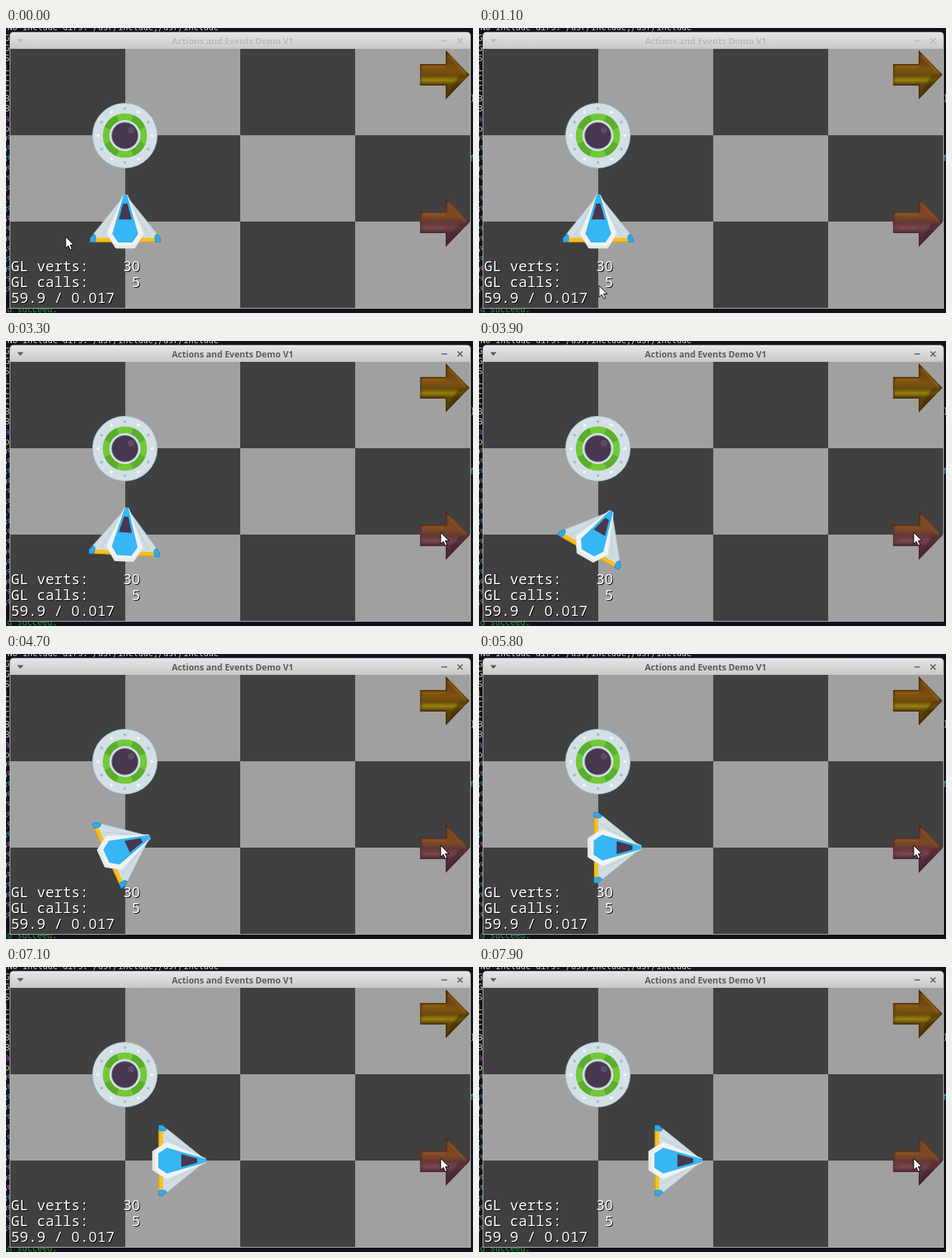
An HTML page that plays this animation: 650x396 px, repeating every 8 s.

```html
<!DOCTYPE html>
<html lang="en">
<head>
<meta charset="utf-8">
<title>Actions and Events Demo V1</title>
<style>
  html, body { margin: 0; width: 100%; height: 100%; overflow: hidden; background: #11121c; }
  svg { display: block; width: 650px; height: 396px; }
  text { white-space: pre; }
  .term { font: 11.63px "DejaVu Sans Mono", monospace; }
  .title { font: bold 12px "Open Sans", "Noto Sans", sans-serif; text-anchor: middle; }
  .stats { font: 20px "Noto Sans Mono", monospace; }
  .zero { font-family: "Open Sans", sans-serif; letter-spacing: .56px; }
  #bar { --ink: #b9b9b9; }
  #bar.active { --ink: #595959; }
</style>
</head>
<body>
<svg viewBox="0 0 650 396">
  <defs>
    <linearGradient id="chrome" x2="0" y2="1">
      <stop stop-color="#e6e6e6"/><stop offset=".5" stop-color="#d8d8d8"/><stop offset="1" stop-color="#c8c8c8"/>
    </linearGradient>
    <linearGradient id="gold" x2="0" y2="1">
      <stop stop-color="#6a3d14"/><stop offset=".3" stop-color="#74480f"/><stop offset=".4" stop-color="#7c5212"/>
      <stop offset=".52" stop-color="#6a4a0b"/><stop offset=".61" stop-color="#94800f"/><stop offset=".7" stop-color="#614809"/>
      <stop offset="1" stop-color="#553a0a"/>
    </linearGradient>
    <linearGradient id="plum" x2="0" y2="1">
      <stop stop-color="#7a4620"/><stop offset=".3" stop-color="#7c471f"/><stop offset=".38" stop-color="#7c4826"/>
      <stop offset=".5" stop-color="#633835"/><stop offset=".62" stop-color="#714052"/><stop offset=".72" stop-color="#56303f"/>
      <stop offset="1" stop-color="#4a2832"/>
    </linearGradient>
    <filter id="soft"><feGaussianBlur stdDeviation="1.3"/></filter>
    <clipPath id="outline"><path id="arrow" d="M.5 20H36V1L69 35L36 69V50H.5Z"/></clipPath>
    <clipPath id="view"><rect x="6" y="29" width="640" height="360"/></clipPath>
  </defs>

  <rect width="650" height="396" fill="#11121c"/>
  <g id="term" class="term">
    <text x="2" y="3" fill="#d4d4d6">No include dirs: /usr/include;/usr/include</text>
    <text x="-5.500" y="395" fill="#2f9a3c">ld succeed.</text>
    <text x="646" y="101" fill="#c8c8cc">)</text>
    <text x="645" y="185" fill="#5ab4d8">f</text>
  </g>

  <path d="M5 390V11Q5 5.500 11 5.500H641Q647 5.500 647 11V390Z" fill="#b4b4b4"/>
  <path d="M6 29V11Q6 6 11 6H641Q646 6 646 11V29Z" fill="url(#chrome)"/>
  <g id="bar">
    <text class="title" x="315.5" y="24" fill="#f4f4f4" fill-opacity=".5">Actions and Events Demo V1</text>
    <text class="title" x="315.5" y="23" fill="var(--ink)">Actions and Events Demo V1</text>
    <path d="M15.500 15.500H24.500L20 20.500Z" fill="var(--ink)"/>
    <path d="M606 18H614M628.500 14.500L635.500 21.500M635.500 14.500L628.500 21.500" stroke="var(--ink)" stroke-width="1.7"/>
  </g>

  <g clip-path="url(#view)">
    <rect x="6" y="29" width="640" height="360" fill="#a0a0a0"/>
    <g id="tiles" fill="#404040"></g>
    <g id="arrows"></g>

    <g id="ufo" transform="translate(165.5 149.5)">
      <circle r="45" fill="#d3e0e6" stroke="#9fbccb"/>
      <circle r="31" fill="#c3d3dc"/>
      <circle r="26" fill="none" stroke="#72c938" stroke-width="9.5"/>
      <circle r="26" fill="none" stroke="#5aae2c" stroke-width="9.5" pathLength="8" stroke-dasharray="1" stroke-dashoffset="-.5"/>
      <circle r="21.500" fill="#d6e2e8"/>
      <circle r="18.500" fill="#47384f" stroke="#8e93a3"/>
      <circle cx="8.500" cy="-7.500" r="4.500" fill="#5d4c66"/>
    </g>

    <g id="ship" stroke-linejoin="round">
      <path d="M-3-34L-44 17L-42 24H42L44 17L3-34Z" fill="#d0dde3" stroke="#b2c7d1"/>
      <path d="M-9-22L-33 20M9-22L33 20" stroke="#b9ccd5"/>
      <path d="M-42 22.500H42V28.500H-42Z" fill="#f7c11a"/>
      <path d="M-42 28H42" stroke="#dd9d12"/>
      <path id="tip" d="M-44 17L-49 23V28.500H-42L-41 20Z" fill="#2fa9e8" stroke="#2386c0" stroke-width=".8"/>
      <use href="#tip" transform="scale(-1 1)"/>
      <path d="M-3-37H3L26 17L13 37H-13L-26 17Z" fill="#f1f3f3" stroke="#d5dfe4" stroke-width=".8"/>
      <path d="M-19 28L-13 37H13L19 28L11 33H-11Z" fill="#e4eaec"/>
      <path d="M-2.500-37H2.500L18 17L10 29H-10L-18 17Z" fill="#36b6f4"/>
      <path d="M-3-25H3L9-3H-9Z" fill="#47384f"/>
    </g>

    <g id="stats" class="stats"></g>
  </g>

  <path id="cursor" d="M0 0V16L3.800 12.500L6.300 18.300L9 17.100L6.500 11.500H11.500Z" fill="#fff" stroke="#000" stroke-linejoin="round"/>
</svg>

<script>
const LOOP = 8000, STEP = 100;
const FOCUS = 3200, TURN = 3240, TURN_MS = 2000, SPEED = 0.0403;
const NS = "http://www.w3.org/2000/svg";
const $ = id => document.getElementById(id);

function add(parent, tag, attrs, html) {
  const el = document.createElementNS(NS, tag);
  for (const k in attrs) el.setAttribute(k, attrs[k]);
  if (html) el.innerHTML = html;
  parent.appendChild(el);
  return el;
}

// Checkerboard
for (let r = 0; r < 3; r++)
  for (let c = r % 2; c < 4; c += 2)
    add($("tiles"), "rect", { x: 6 + c * 160, y: 29 + r * 120, width: 160, height: 120 });

// Rivets on the saucer
for (let i = 0; i < 12; i++) {
  const a = i * Math.PI / 6;
  add($("ufo"), "circle", {
    cx: 37.5 * Math.cos(a), cy: 37.5 * Math.sin(a), r: 2, fill: i % 2 ? "#a2bccb" : "#f6f9fa"
  });
}

// Glossy arrows: base colour, then blurred shade and shine kept inside the outline
function arrow(y, fill, edge, shine) {
  const g = add($("arrows"), "g", { transform: `translate(576 ${y})` });
  add(g, "use", { href: "#arrow", fill: `url(#${fill})` });
  const gloss = add(add(g, "g", { "clip-path": "url(#outline)" }), "g", { filter: "url(#soft)", fill: "none" });
  add(gloss, "path", { d: "M36 69L69 35L36 1V20H0V50H36Z", stroke: edge, "stroke-width": 3 });
  add(gloss, "path", { d: "M40 64L64 36L55 36L42 54Z", fill: edge, opacity: .6 });
  add(gloss, "path", { d: "M40 8L64 33M4 24H36", stroke: shine, "stroke-width": 2.5, opacity: .6 });
  add(gloss, "path", { d: "M8 42H34", stroke: shine, "stroke-width": 2, opacity: .5 });
}
arrow(30, "gold", "#432c08", "#a8791a");
arrow(235, "plum", "#452528", "#9c5f2a");

// Counters
["GL verts:    30", "GL calls:     5", "59.9 / 0.017"].forEach((line, i) => {
  const html = line.replace(/0/g, '<tspan class="zero">0</tspan>');
  const y = 338 + i * 22;
  add($("stats"), "text", { x: 8, y: y + 1, fill: "#000" }, html);
  add($("stats"), "text", { x: 7, y, fill: "#fff" }, html);
});

// Terminal edge showing beside the window
[..."GGSLCCBBap"].forEach((ch, i) =>
  add($("term"), "text", { x: -2, y: 18 + i * 14, fill: i === 8 ? "#a64bc0" : "#c6c6ca" }, ch));
for (let i = 0; i < 16; i++)
  add($("term"), "text", { x: -5, y: 158 + i * 14, fill: i % 5 === 2 ? "#55b2d6" : "#8fb5bb" }, (i * 7 + 9) % 10 + "%");

// Pointer path: time, x, y
const path = [
  [200, 83, 290], [400, 104, 232], [500, 142, 208], [600, 192, 215], [800, 247, 275],
  [1000, 207, 347], [1100, 167, 358], [1200, 188, 374], [1400, 295, 383], [1600, 448, 361],
  [1800, 575, 305], [2000, 622, 269], [2100, 605, 266]
];

function pointer(t) {
  if (t <= path[0][0]) return path[0].slice(1);
  const last = path.length - 1;
  if (t >= path[last][0]) return path[last].slice(1);
  const i = path.findIndex(p => p[0] > t) - 1;
  const [a, b] = [path[i], path[i + 1]];
  const k = (t - a[0]) / (b[0] - a[0]);
  return [1, 2].map(n => a[n] + (b[n] - a[n]) * k);
}

function draw(now) {
  const t = Math.floor((now % LOOP) / STEP) * STEP;
  const angle = 90 * Math.min(1, Math.max(0, (t - TURN) / TURN_MS));
  const x = 166 + Math.max(0, t - TURN - TURN_MS) * SPEED;
  $("ship").setAttribute("transform", `translate(${x} 269) rotate(${angle})`);
  $("cursor").setAttribute("transform", `translate(${pointer(t)})`);
  $("bar").classList.toggle("active", t >= FOCUS);
}

const start = performance.now();
function tick() {
  draw(performance.now() - start);
  requestAnimationFrame(tick);
}
tick();
</script>
</body>
</html>
```
